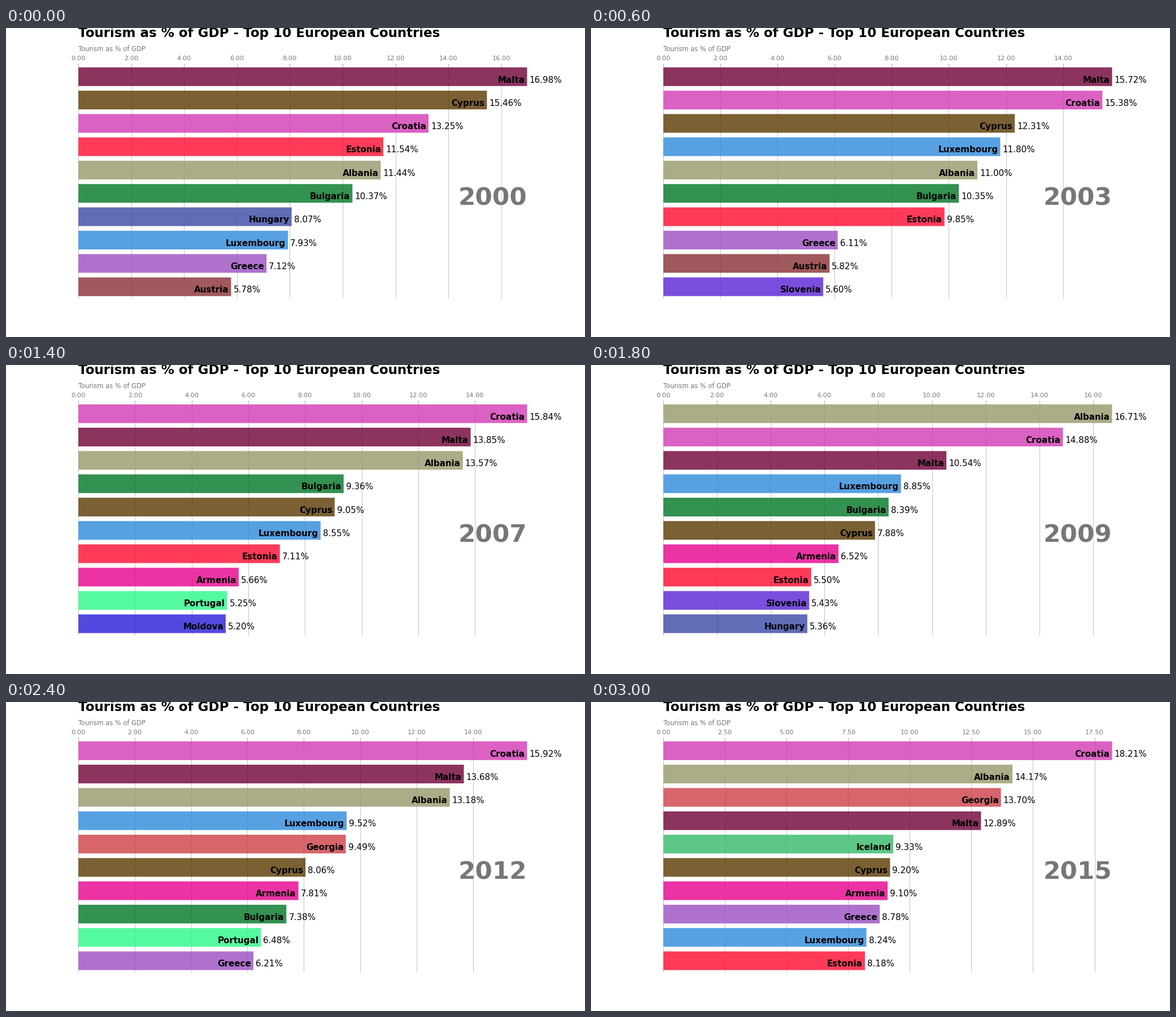
These frames come from a looping animation (1025x547 px, 3.2 s). A matplotlib script:

```python
import numpy as np
import matplotlib.pyplot as plt
from matplotlib.animation import FuncAnimation
from matplotlib.ticker import StrMethodFormatter

WIDTH, HEIGHT = 1025, 547
DPI = WIDTH / 15
FIRST_YEAR, YEARS, STEP_MS = 2000, 16, 200
GREY = "#777777"

plt.rcParams["font.family"] = "DejaVu Sans"

# Colour, then a few turning points spread evenly over the whole period.
COUNTRIES = {
    "Malta": ("#700036", 16.98, 15.72, 15.5, 10.54, 13.68, 12.89),
    "Cyprus": ("#593800", 15.46, 10.21, 7.3, 9.2),
    "Croatia": ("#d23ab4", 13.25, 16.8, 14.4, 18.21),
    "Estonia": ("#ff0a30", 11.54, 8.72, 4.7, 8.18),
    "Albania": ("#98986a", 11.44, 11, 12, 16.71, 13.18, 14.17),
    "Bulgaria": ("#007626", 10.37, 10.34, 7.9, 6.6),
    "Hungary": ("#3a48a5", 8.07, 4.4, 4.8, 5.36, 5.4, 5.4),
    "Luxembourg": ("#2d8adc", 7.93, 11.8, 8.4, 8.85, 9.52, 8.24),
    "Greece": ("#9a4fc2", 7.12, 5.43, 4.5, 8.78),
    "Austria": ("#883033", 5.78, 5.85, 4.1, 4),
    "Slovenia": ("#5922d6", 5, 5.6, 5.04, 5.43, 5.6, 5.8),
    "Armenia": ("#e6008e", 2.65, 9.1),
    "Portugal": ("#2af88a", 4, 5.15, 5.4, 8.1),
    "Moldova": ("#271dd8", 5.2),
    "Georgia": ("#cd3e46", -7.35, 13.7),
    "Iceland": ("#34b969", -8.3, 9.33),
}

fig = plt.figure(figsize=((WIDTH + 1e-6) / DPI, (HEIGHT + 1e-6) / DPI),
                 dpi=DPI, facecolor="white")
ax = fig.add_axes([0.125, 0.125, 0.775, 0.755])


def share(i, points):
    """Move in straight lines from one turning point to the next."""
    return np.interp(i, np.linspace(0, YEARS - 1, len(points)), points)


def top_ten(i):
    """Return (value, name, colour) rows, smallest first."""
    rows = [(share(i, points), name, color)
            for name, (color, *points) in COUNTRIES.items()]
    return sorted(rows)[-10:]


def note(x, y, text, size, **style):
    ax.text(x, y, text, size=size, transform=ax.transAxes, **style)


def draw(i):
    values, names, colors = zip(*top_ten(i))
    gap = values[-1] / 200

    ax.clear()
    ax.set_frame_on(False)
    ax.barh(range(10), values, color=colors, alpha=0.8, snap=False)
    for row, (value, name) in enumerate(zip(values, names)):
        y = row - 0.25
        ax.text(value - gap, y, name, size=16, weight=600, ha="right")
        ax.text(value + gap, y, f"{value:.2f}%", size=16, ha="left")

    note(1, 0.4, FIRST_YEAR + i, 46, color=GREY, weight=800, ha="right")
    note(0, 1.06, "Tourism as % of GDP", 12.2, color=GREY)
    note(0, 1.12, "Tourism as % of GDP - Top 10 European Countries", 24.25,
         weight=600)

    ax.xaxis.set_major_formatter(StrMethodFormatter("{x:,.2f}"))
    ax.xaxis.set_ticks_position("top")
    ax.tick_params(axis="x", colors=GREY, labelsize=12)
    ax.set_yticks([])
    ax.margins(0, 0.01)
    ax.grid(which="major", axis="x", linestyle="-", color="#b0b0b0",
            linewidth=0.8)
    ax.set_axisbelow(True)
    return []


anim = FuncAnimation(fig, draw, frames=YEARS, init_func=lambda: draw(0),
                     interval=STEP_MS, repeat=True, repeat_delay=0)
plt.show()
```
